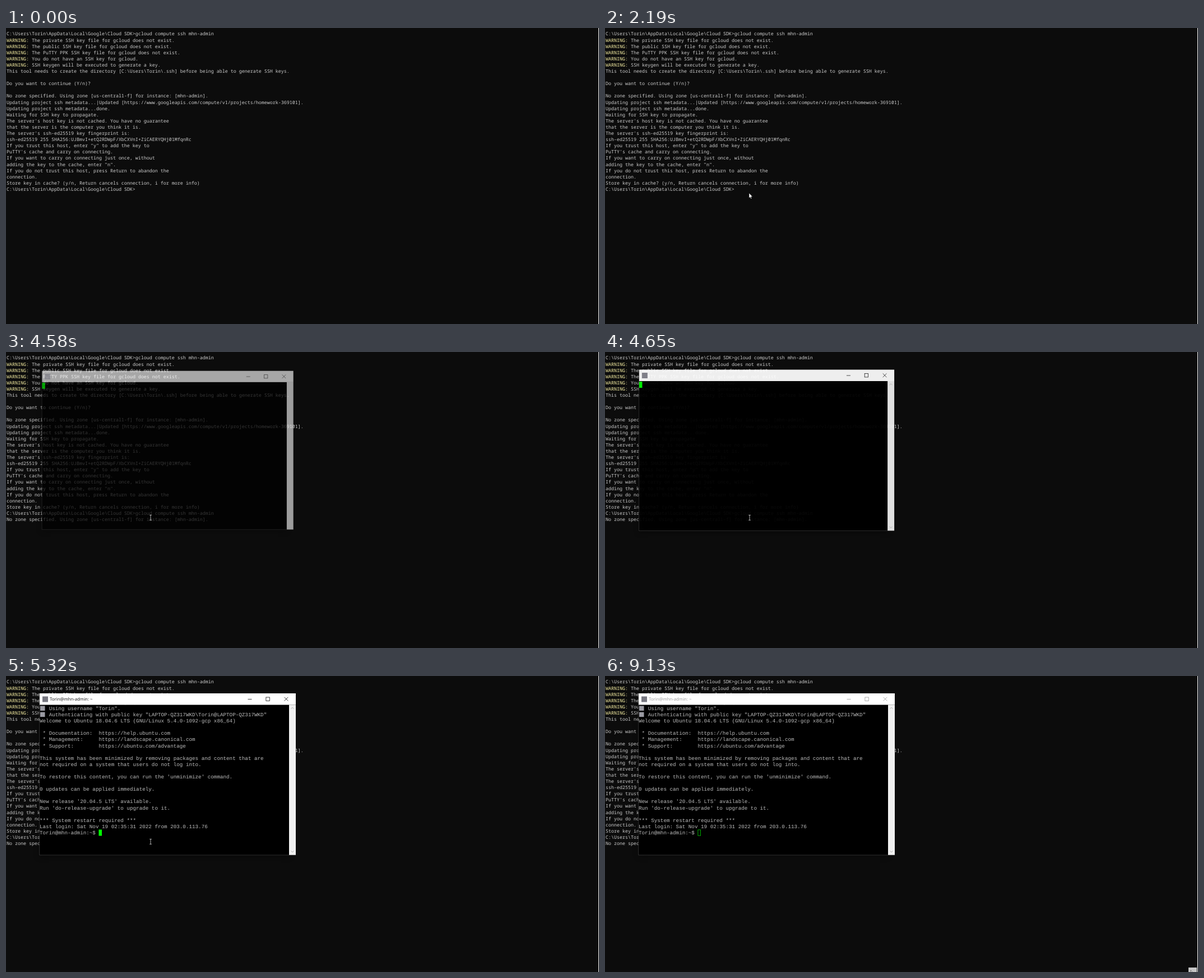
An HTML page with a canvas that plays this animation: 1058 by 529 pixels, repeating every 9200 ms.

```html
<!DOCTYPE html>
<html lang="en">
<head>
<meta charset="utf-8">
<title>SSH session</title>
<style>
  html, body { margin: 0; width: 100%; height: 100%; overflow: hidden; background: #0c0c0c; }
  canvas { display: block; }
</style>
</head>
<body>
<canvas id="stage" width="1058" height="529"></canvas>
<script>
const ctx = document.getElementById('stage').getContext('2d');
const LOOP = 9200;
const TICKS_PER_MS = 0.015;
const TICK_OFFSET = 22;
const ROW = 11.1;
const CONSOLE_FONT = '8.333px "Noto Sans Mono", monospace';
const SSH_FONT = '9.25px "Liberation Mono", monospace';
const TITLE_FONT = '7.8px "Open Sans", sans-serif';
const SSH_COL = 5.55;

const prompt = String.raw`C:\Users\Torin\AppData\Local\Google\Cloud SDK>`;
const command = 'gcloud compute ssh mhn-admin';
const zoneLine = 'No zone specified. Using zone [us-central1-f] for instance: [mhn-admin].';
const consoleLines = String.raw`${prompt}${command}
WARNING: The private SSH key file for gcloud does not exist.
WARNING: The public SSH key file for gcloud does not exist.
WARNING: The PuTTY PPK SSH key file for gcloud does not exist.
WARNING: You do not have an SSH key for gcloud.
WARNING: SSH keygen will be executed to generate a key.
This tool needs to create the directory [C:\Users\Torin\.ssh] before being able to generate SSH keys.

Do you want to continue (Y/n)?

${zoneLine}
Updating project ssh metadata...|Updated [https://www.googleapis.com/compute/v1/projects/homework-369101].
Updating project ssh metadata...done.
Waiting for SSH key to propagate.
The server's host key is not cached. You have no guarantee
that the server is the computer you think it is.
The server's ssh-ed25519 key fingerprint is:
ssh-ed25519 255 SHA256:UJBmvI+etQ2RDWpF/XbCXVnI+ZiCAERYQHj01MfqnRc
If you trust this host, enter "y" to add the key to
PuTTY's cache and carry on connecting.
If you want to carry on connecting just once, without
adding the key to the cache, enter "n".
If you do not trust this host, press Return to abandon the
connection.
Store key in cache? (y/n, Return cancels connection, i for more info)`.split('\n');

const sshPrompt = 'Torin@mhn-admin:~$ ';
const sshLines = String.raw`   Using username "Torin".
   Authenticating with public key "LAPTOP-QZ317WKD\Torin@LAPTOP-QZ317WKD"
Welcome to Ubuntu 18.04.6 LTS (GNU/Linux 5.4.0-1092-gcp x86_64)

 * Documentation:  https://help.ubuntu.com
 * Management:     https://landscape.canonical.com
 * Support:        https://ubuntu.com/advantage

This system has been minimized by removing packages and content that are
not required on a system that users do not log into.

To restore this content, you can run the 'unminimize' command.

0 updates can be applied immediately.

New release '20.04.5 LTS' available.
Run 'do-release-upgrade' to upgrade to it.

*** System restart required ***
Last login: Sat Nov 19 02:35:31 2022 from 203.0.113.76
${sshPrompt}`.split('\n');

// Mouse position by tick: [tick, x, y]
const mousePath = [
  [5, 725, 453], [6, 586, 421], [7, 482, 400], [9, 482, 400],
  [13, 330, 320], [16, 243, 283], [18, 241, 289], [22, 241, 289],
  [27, 249, 291], [30, 249, 291], [33, 257, 295], [107, 257, 295],
  [108, 348, 276], [109, 620, 350], [110, 817, 418], [112, 817, 418],
  [113, 905, 452], [115, 1044, 513], [133, 1044, 513], [134, 1045, 526]
];
// Console caret: [first tick, end tick, column, row]
const caretSpans = [[25, 33, 46, 25], [37, 41, 0, 26], [49, 57, 0, 26], [59, 67, 0, 27]];

function rect(x, y, w, h, color) {
  ctx.fillStyle = color;
  ctx.fillRect(x, y, w, h);
}

function text(str, x, y, color, font) {
  ctx.font = font;
  ctx.textRendering = 'geometricPrecision';
  ctx.fillStyle = color;
  ctx.fillText(str, x, y);
}

function stroke(points, color, width = 0.8) {
  ctx.beginPath();
  points.forEach(([x, y], i) => i ? ctx.lineTo(x, y) : ctx.moveTo(x, y));
  ctx.strokeStyle = color;
  ctx.lineWidth = width;
  ctx.stroke();
}

function drawConsole(tick) {
  rect(0, 0, 1058, 529, '#0c0c0c');
  rect(1057, 0, 1, 529, '#ffffff');
  const lines = [...consoleLines, prompt + (tick >= 37 ? command : '')];
  if (tick >= 59) lines.push(zoneLine);
  lines.forEach((line, i) => {
    const y = 13.4 + i * ROW;
    const label = line.startsWith('WARNING:') ? 8 : 0;
    text(line.slice(0, label), 1, y, '#f9f1a5', CONSOLE_FONT);
    text(line.slice(label), 1 + label * 5, y, '#cccccc', CONSOLE_FONT);
  });
  for (const [start, end, col, row] of caretSpans)
    if (tick >= start && tick < end) rect(1 + col * 5, Math.round(13.4 + row * ROW), 5, 3, '#cccccc');
}

function drawTitleBar(title, active) {
  const ink = active ? '#111111' : '#999999';
  rect(60, 31, 457, 20.5, '#ffffff');
  rect(65, 36.5, 10, 10, '#777780');
  text(title, 78, 44.2, ink, TITLE_FONT);
  stroke([[431.5, 41.5], [438.5, 41.5]], ink);
  ctx.strokeRect(463.9, 38, 6.4, 6.4);
  stroke([[496.5, 37.8], [503.3, 44.6]], ink);
  stroke([[503.3, 37.8], [496.5, 44.6]], ink);
}

function drawWindow(tick) {
  if (tick < 68) return;
  const [alpha, scale] = [[0.3, 0.955], [0.64, 0.981], [0.93, 0.996]][tick - 68] || [1, 1];
  const active = tick < 135;
  const title = tick < 72 ? '' : tick < 79 ? '203.0.113.110 - PuTTY' : 'Torin@mhn-admin: ~';
  const rows = tick < 72 ? 0 : tick < 73 ? 1 : tick < 79 ? 2 : tick < 80 ? 20 : 21;

  ctx.save();
  ctx.globalAlpha = alpha;
  ctx.translate(288.5, 175.5);
  ctx.scale(scale, scale);
  ctx.translate(-288.5, -175.5);

  ctx.shadowColor = `rgba(0, 0, 0, ${active ? 0.45 : 0.25})`;
  ctx.shadowBlur = 10;
  ctx.shadowOffsetY = 3;
  // The body leaves the title bar and scrollbar free so that each layer fades once.
  rect(60, 51.5, 445, 268.5, '#000000');
  drawTitleBarShadowless(title, active);
  rect(505, 51.5, 12, 268.5, '#f0f0f0');
  stroke([[508.5, 58.7], [511, 56.2], [513.5, 58.7]], '#a0a0a0');
  stroke([[508.5, 312.5], [511, 315], [513.5, 312.5]], '#a0a0a0');
  stroke([[59.7, 31], [59.7, 320], [517, 320]], '#555555', 0.5);

  sshLines.slice(0, rows).forEach((line, i) => {
    text(line, 60, 60.9 + i * ROW, '#bbbbbb', SSH_FONT);
    if (i < 2) rect(61, 53.5 + i * ROW, 8.5, 8.5, '#9a9aa2');
  });

  const atPrompt = rows === 21;
  const cursorX = 60 + (atPrompt ? sshPrompt.length * SSH_COL : 0);
  const cursorY = 52.5 + (atPrompt ? 20 : rows) * ROW;
  if (active) {
    rect(cursorX, cursorY, SSH_COL, ROW, '#00ff00');
  } else {
    ctx.strokeStyle = '#00d000';
    ctx.lineWidth = 0.8;
    ctx.strokeRect(cursorX + 0.4, cursorY + 0.4, SSH_COL - 0.8, ROW - 0.8);
  }
  ctx.restore();
}

function drawTitleBarShadowless(title, active) {
  ctx.shadowColor = 'transparent';
  drawTitleBar(title, active);
}

function mouseAt(tick) {
  const next = mousePath.findIndex(key => key[0] > tick);
  if (next < 0) return mousePath.at(-1).slice(1);
  const [t0, x0, y0] = mousePath[next - 1];
  const [t1, x1, y1] = mousePath[next];
  const k = (tick - t0) / (t1 - t0);
  return [x0 + (x1 - x0) * k, y0 + (y1 - y0) * k];
}

function drawMouse(tick) {
  if (tick < mousePath[0][0]) return;
  const [x, y] = mouseAt(tick);
  if (tick >= 69 && tick < 109) {
    const cx = tick < 108 ? x + 1 : x + 0.5;
    const top = tick < 108 ? y - 3.5 : y - 4.5;
    stroke([[cx, top], [cx, top + 9]], '#d8d8d8');
    for (const end of [top, top + 9]) stroke([[cx - 1.8, end], [cx + 1.8, end]], '#d8d8d8');
    return;
  }
  ctx.save();
  ctx.translate(x, y);
  ctx.beginPath();
  for (const [px, py] of [[0, 0], [0, 9], [2, 7.2], [3.4, 10.2], [4.7, 9.6], [3.4, 6.7], [6.2, 6.5]])
    ctx.lineTo(px, py);
  ctx.closePath();
  ctx.fillStyle = '#ffffff';
  ctx.fill();
  ctx.strokeStyle = '#000000';
  ctx.lineWidth = 0.5;
  ctx.stroke();
  ctx.restore();
}

function frame(now) {
  const tick = Math.floor((now % LOOP + TICK_OFFSET) * TICKS_PER_MS);
  drawConsole(tick);
  drawWindow(tick);
  if (tick >= 134) rect(1041, 521, 15, 8, '#c4c4c4');
  drawMouse(tick);
  requestAnimationFrame(() => frame(performance.now() - start));
}

const start = performance.now();
frame(0);
</script>
</body>
</html>
```
